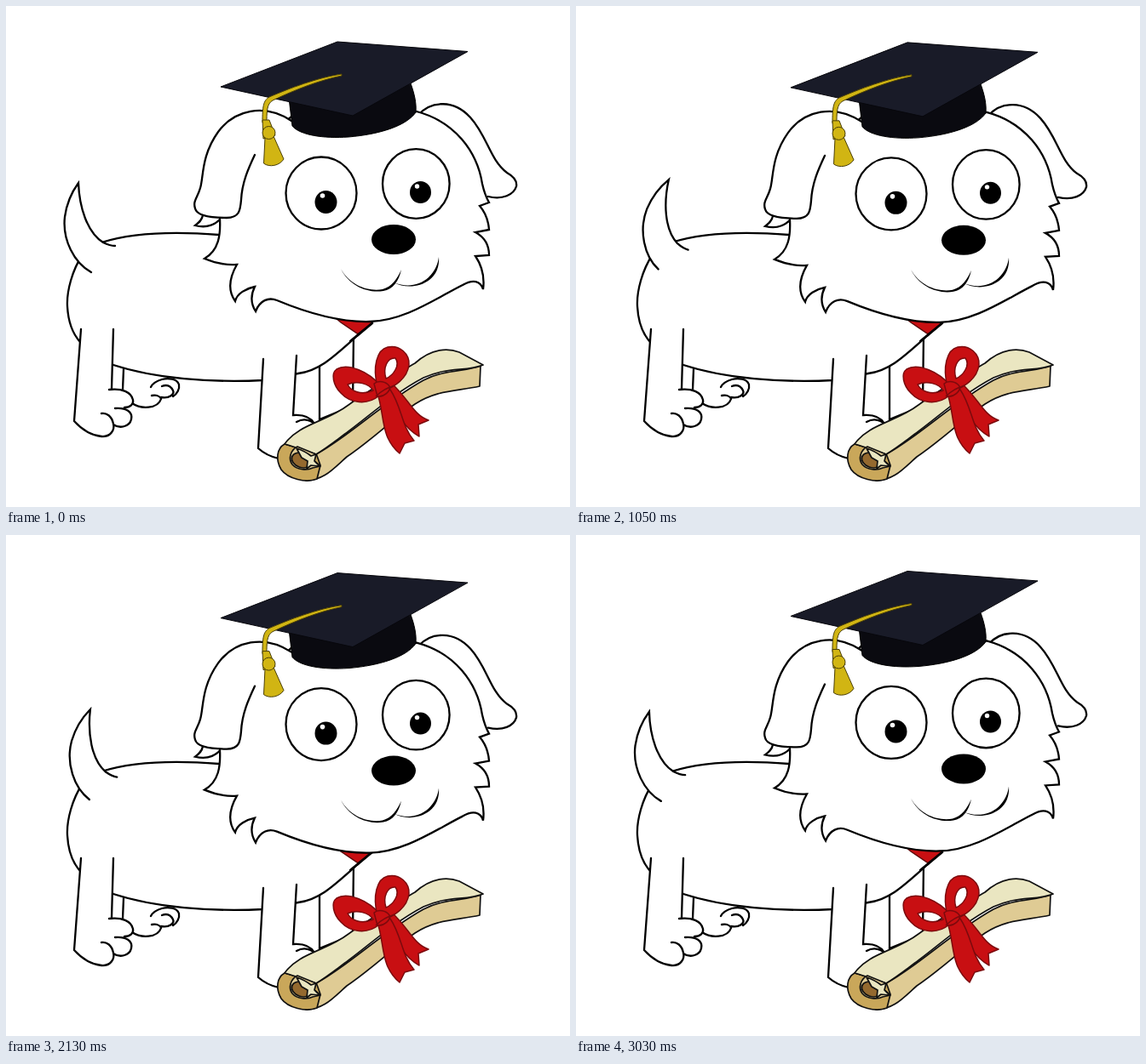
An HTML page for the animation above (3060 ms loop, 662x589 px).

```html
<!DOCTYPE html>
<html lang="en">
<head>
<meta charset="utf-8">
<title>Graduate dog</title>
<style>
  html, body { margin: 0; width: 100%; height: 100%; overflow: hidden; background: #fff; }
  svg { display: block; width: 662px; height: 589px; }
  .ink { fill: #fff; stroke: #000; stroke-width: 2.3; stroke-linecap: round; stroke-linejoin: miter; }
  .line { fill: none; }
  .paper { stroke: #111; stroke-width: 1.7; stroke-linejoin: round; }
  .ribbon { fill: #c80f12; fill-rule: evenodd; stroke: #7c0a0d; stroke-width: 1.5; stroke-linejoin: round; }
  .gold { fill: #d1b513; stroke: #4a3f08; stroke-width: 1; stroke-linejoin: round; }
</style>
</head>
<body>
<svg viewBox="0 0 662 589">
  <!-- far legs -->
  <g class="ink">
    <path d="M138 425 L137 452 L149 466 C158 474 177 474 182 461 C194 463 198 457 195 451 C202 456 205 444 201 441 C197 437 190 437 181 441 L165 430" stroke="none"/>
    <path class="line" d="M138 427 L137 451 M148 467 C158 474 178 474 182 462 C181 459 177 457 171 458 M182 460 C192 462 198 456 196 452 C193 446 188 445 183 447 M196 459 C201 456 204 450 203 445 C201 438 190 437 183 439 C176 441 172 444 170 448"/>
    <path d="M368 410 L368 486 L407 470 L408 385" />
  </g>

  <!-- body -->
  <path class="ink" d="M90 292 C78 310 71 335 72 353 C73 372 78 385 87 395 L126 422 C175 438 240 443 302 440 L343 432 C368 429 385 412 412 388 L430 373 L400 300 L250 269 C200 265 150 266 112 278 Z"/>
  <path d="M386 366 L393 372 L413 385.500 L430 373 L425 362 Z" fill="#c80f12" stroke="#5c0808" stroke-width="1.500"/>
  <path class="ink line" d="M404 394 L430 372.500"/>

  <!-- near legs -->
  <g class="ink">
    <path d="M88 380 L80 488 C90 499 102 505 112 506 C122 507 128 499 126 492 C133 497 145 495 147 486 C149 478 143 473 136 472 C145 473 150 468 149 463 C147 454 136 449 124 450 L126 380" stroke="none"/>
    <path class="line" d="M88 380 L80 488 C90 499 102 505 112 506 C122 507 128 499 126 491 C124 482 118 478 112 479 M126 492 C133 497 145 495 147 486 C149 477 141 472 128 473 M139 472 C146 472 150 468 149 463 C147 454 136 449 121 451 M126 380 L124 450"/>
    <path d="M302 415 L296 520 L318 532 L362 510 L362 490 C356 483 347 481 337 481 L341 411" stroke="none"/>
    <path class="line" d="M302 415 L296 520 C304 527 311 530 320 532 M341 411 L337 481 C350 480 358 484 362 491 M341 489 C350 484 358 487 364 493"/>
  </g>

  <path id="tail" class="ink" d="M100 313 C80 302 66 275 69 248 C71 233 77 219 85 208 C86 236 95 266 114 278 C118 280 123 282 128 282"/>

  <g id="head">
    <!-- ears and face -->
    <path class="ink" d="M484 128 C499 111 526 110 545 131 C565 153 568 181 588 196 C597 201 600 206 599 212 C596 222 583 228 566 224"/>
    <path class="ink" d="M231 246 C230 252 226 255 222 258 C234 261 244 258 251 251 L260 240"/>
    <path class="ink" d="M251 250 C252 269 250 287 233 297 C245 302 258 305 271 304 C263 318 259 333 269 347 C271 338 282 332 292 330 C286 342 288 351 293 359 C298 346 308 342 318 346 C354 361 392 372 427 371 C468 370 504 344 536 328 C548 321 557 323 560 333 C562 318 559 306 551 294 L567 293 C567 281 562 272 551 266 L567 263 C566 250 562 242 556 235 L567 231 C563 224 561 218 559 209 C553 171 527 136 482 124 L335 130 L280 180"/>
    <path class="ink" d="M335 135 C303 114 268 122 249 148 C229 176 232 201 228 214 C225 225 219 229 222 238 C224 247 242 249 259 249 C274 249 275 240 276 228 C277 207 285 190 292 175"/>

    <!-- features -->
    <g class="ink">
      <ellipse cx="370" cy="220" rx="41.500" ry="42.500"/>
      <ellipse cx="481.300" cy="209" rx="39.300" ry="40.800"/>
    </g>
    <ellipse cx="375.500" cy="230.500" rx="13" ry="13.500"/>
    <ellipse cx="486.500" cy="219" rx="12.500" ry="13"/>
    <circle cx="371.500" cy="223" r="2.800" fill="#fff"/>
    <circle cx="482.500" cy="212" r="2.700" fill="#fff"/>
    <ellipse cx="455" cy="274.500" rx="26" ry="17.500"/>
    <path d="M393 309 C404 329 426 336 442 333 C453 330 459 321 464 310 C461 324 454 333 443 335 C424 338 403 329 393 309 Z"/>
    <path d="M455 325 C470 331 485 329 496 319 C504 311 507 303 508 295 C509 306 505 316 497 322 C485 331 468 332 455 325 Z"/>

    <!-- cap -->
    <path d="M332 108 L336 141 C345 152 373 156 402 154 C438 151 470 141 481 125 C482 114 479 102 475 91 Z" fill="#0a0a10" stroke="#000"/>
    <path d="M252 95 L389 42 L542 53.500 L407 129 Z" fill="#191b28" stroke="#07070c"/>
    <path class="gold" d="M394 80 C366 84 332 97 309 107 C302 111 301 118 301 137 L306 140 C306 124 306 115 313 111 C340 98 369 87 394 82 Z"/>
    <path class="gold" d="M301 134 L302 156 L316 152 L309 134 Z"/>
    <path class="gold" d="M304 155 L302.500 185 C309 190 321 188 326 180 L314 153 Z"/>
    <circle class="gold" cx="308.500" cy="149" r="7.500"/>
  </g>

  <!-- diploma -->
  <g class="paper">
    <path fill="#dfcb94" d="M364 527 C400 508 440 468 490 440 C515 427 540 430 557 423 L556 447 C530 453 506 451 480 468 C450 489 427 512 400 530 C384 544 374 557 352 558 Z"/>
    <path fill="#c9a75a" d="M327 515 C318 520 316 533 323 545 C331 556 352 561 365 556 L369 540 L364 526 Z"/>
    <path fill="#eae6c1" d="M327 515 C344 491 376 489 402 469 C430 449 455 435 480 420 C500 402 519 402 532 407 L560 422 C540 430 518 424 490 437 C456 455 430 479 402 500 C387 511 376 520 364 527 C352 524 340 518 327 515 Z"/>
    <path fill="#dfcb94" d="M342 518 C334 522 331 532 336 539 C342 546 354 546 360 543 L369 541 L361 534 L364 527 Z"/>
    <ellipse cx="347" cy="534" rx="12" ry="8.500" transform="rotate(20 347 534)" fill="#94692f"/>
    <path fill="#eae6c1" d="M341 520 C347 522 353 525 358 529 L364 527 L362 535 L368 541 L358 540 L353 544 L354 535 L347 531 Z"/>
  </g>

  <!-- ribbon -->
  <g class="ribbon">
    <path d="M449 452 C457 468 460 492 485 506 L484 492 L496 487 C478 481 473 462 452 443 Z"/>
    <path d="M435 453 C445 478 438 506 462 526 L468 514 L479 511 C464 494 465 472 451 451 Z"/>
    <path d="M438 458 C424 470 404 467 393 455 C384 446 381 432 388 427 C401 419 426 430 439 446 Z M401 445 C405 453 417 458 431 452 C426 444 412 440 401 445 Z"/>
    <path d="M436 447 C430 425 435 404 448 401 C462 398 474 409 473 422 C471 438 457 447 441 454 Z M446 438 C442 425 448 413 457 414 C463 422 455 434 446 438 Z"/>
    <path d="M432 444 C437 440 446 441 450 447 C452 453 443 460 436 459 Z"/>
    <path d="M434 459 C441 452 446 450 456 446" fill="none"/>
  </g>
</svg>
<script>
  const LOOP = 3060, STEP = 30, BOB = 34, WAG = 26;
  const head = document.getElementById('head');
  const tail = document.getElementById('tail');

  // Keys are [step, value] pairs, joined by straight lines.
  const bobKeys = [[0, 0], [12, 10.4], [BOB, 0]];
  const wagKeys = [[0, 0], [3, 5], [9, 14.8], [12, 18], [19, 8.7], [23, 0.6], [WAG, 0]];

  function at(keys, x) {
    const i = keys.findIndex(k => k[0] > x);
    const [x0, y0] = keys[i - 1], [x1, y1] = keys[i];
    return y0 + (y1 - y0) * (x - x0) / (x1 - x0);
  }

  function draw() {
    const step = Math.floor(performance.now() % LOOP / STEP);
    head.setAttribute('transform', `translate(0 ${at(bobKeys, step % BOB)})`);
    tail.setAttribute('transform', `rotate(${at(wagKeys, step % WAG)} 112 298)`);
    requestAnimationFrame(draw);
  }
  draw();
</script>
</body>
</html>
```
